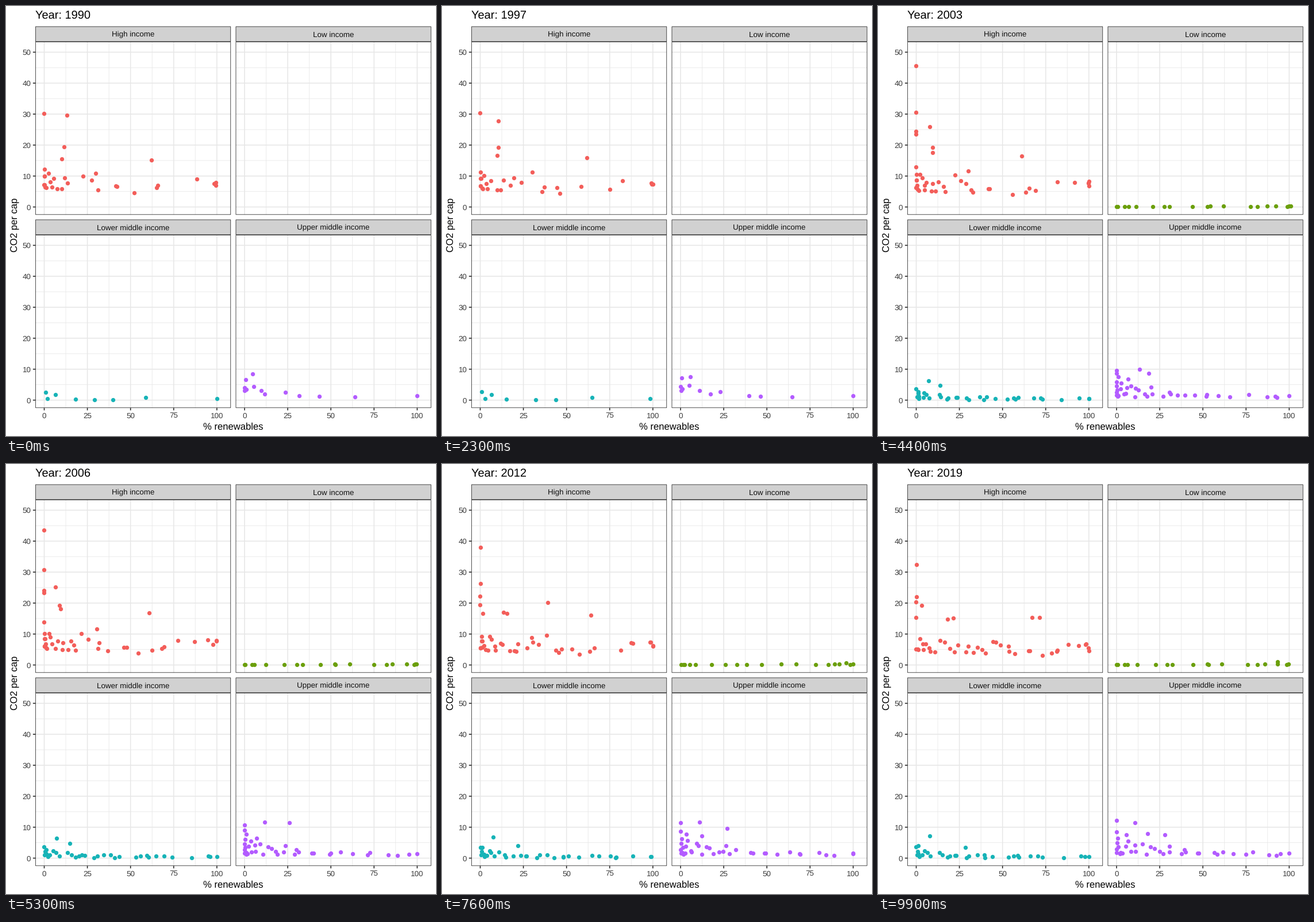
Recreate the animation shown at these times as a matplotlib script. Size 748 by 748 pixels, loop 10 s.

```python
import numpy as np
import matplotlib.pyplot as plt
from matplotlib.animation import FuncAnimation
from matplotlib.patches import Rectangle

SIZE, FRAMES = 748, 100
PX = 0.72  # points per pixel at 100 dpi
LAST = FRAMES - 1
LATE = 34 / LAST  # moment when the remaining countries enter
MIDDLE = 53 / LAST
GRID, DARK, LABEL, STRIP = "#e7e7e7", "#242424", "#3b3b3b", "#d1d1d1"
PANEL_W, PANEL_H, STRIP_H = 340.1, 301, 26.7
COLUMNS, ROWS = (51.05, 399.55), (62.2, 398.2)

plt.rcParams["font.family"] = ["Liberation Sans", "DejaVu Sans"]
plt.rcParams["text.hinting"] = "none"
fig = plt.figure(figsize=(SIZE / 100, SIZE / 100), dpi=100, facecolor="white")
ax = fig.add_axes([0, 0, 1, 1])
ax.set(xlim=(0, SIZE), ylim=(SIZE, 0))
ax.axis("off")


def text(x, y, s, px, color="black", **kw):
    return ax.text(x, y, s, fontsize=px * PX, color=color, va="baseline", **kw)


def line(xs, ys, color, width, z=1):
    ax.plot(xs, ys, color=color, lw=width * PX, zorder=z, solid_capstyle="butt", snap=False)


def box(x, y, w, h, fill):
    """Rectangle whose thin outline lies inside its edges."""
    ax.add_patch(Rectangle((x + 0.4, y + 0.4), w - 0.8, h - 0.8, fc=fill, ec=DARK,
                           lw=0.8 * PX, zorder=4, snap=False))


class Crowd:
    """Evenly scattered dots: share follows a power law, height fades with share."""

    def __init__(self, seed, early, late, power, height, trend=0.0):
        rng = np.random.default_rng(seed)
        self.early, self.power, self.height, self.trend = early, power, height, trend
        self.rank = (0.5 + 0.618034 * np.arange(late)) % 1
        self.phase, self.level, self.extra = rng.random((3, late))

    def share(self, t):
        sway = 0.02 * np.sin(2 * np.pi * (2 * t + self.phase))
        return 100 * np.clip(1.04 * (self.rank + sway), 0, 1) ** self.power(t)

    def at(self, t):
        base, spread, rise, reach = self.height
        x = self.share(t)
        y = base + spread * self.level + rise * self.extra ** 2 * np.exp(-x / reach)
        y = y * (1 + self.trend * (t - 0.5))
        n = len(x) if t >= LATE else self.early
        return np.column_stack([x, y])[:n]


class Basin(Crowd):
    """A crowd that gathers at both ends of the share axis."""

    def share(self, t):
        sway = 0.02 * np.sin(2 * np.pi * (2 * t + self.phase))
        return 50 - 50 * np.cos(np.pi * np.clip(self.rank + sway, 0, 1))


class Panel:
    def __init__(self, title, color, col, row, crowd, tracks):
        self.left, self.top = COLUMNS[col], ROWS[row]
        self.bottom = self.top + PANEL_H
        self.crowd, self.tracks = crowd, tracks
        self.draw_frame(title)
        self.dots = ax.scatter([], [], s=(7.3 * PX) ** 2, color=color, lw=0, zorder=3)

    def to_px(self, x, y):
        return self.left + 15.45 + 3.003 * x, self.bottom - 13.6 - 5.385 * y

    def draw_frame(self, title):
        l, t, b = self.left, self.top, self.bottom
        r = l + PANEL_W
        for v in np.arange(0, 101, 12.5):
            x = self.to_px(v, 0)[0]
            line([x, x], [t, b], GRID, 0.8 if v % 25 else 1.6)
        for v in range(0, 51, 5):
            y = self.to_px(0, v)[1]
            line([l, r], [y, y], GRID, 0.8 if v % 10 else 1.6)
        box(l, t, PANEL_W, PANEL_H, "none")
        box(l, t - STRIP_H, PANEL_W, STRIP_H, STRIP)
        text((l + r) / 2, t - 8.5, title, 13.33, "#101010", ha="center", zorder=5)

    def show(self, t):
        leaders = [[np.interp(t, (born, MIDDLE, 1), v) for v in (xs, ys)]
                   for born, xs, ys in self.tracks if t >= born]
        pts = np.vstack([self.crowd.at(t), np.reshape(leaders, (-1, 2))])
        self.dots.set_offsets(np.column_stack(self.to_px(*pts.T)))


# Tracks: moment of entry, then shares and heights at entry, middle and end.
high = Panel(
    "High income", "#f35e5a", 0, 0,
    Crowd(4, 25, 36, lambda t: 3.2 - 1.65 * t ** 2.5, (3.2, 5, 5, 40), -0.35),
    [(0, (0, 0, 0.2), (30.2, 30.7, 22)),
     (0, (13.2, 6.6, 71.5), (29.6, 25.2, 15.3)),
     (0, (11.5, 8.9, 18.2), (19.4, 19.2, 14.7)),
     (0, (10, 9.5, 21.4), (15.5, 18.1, 15.2)),
     (0, (62.2, 60.9, 67), (15.1, 16.8, 15.4)),
     (0, (29.8, 30.4, 46.2), (10.9, 11.7, 7.4)),
     (0, (99.5, 99.6, 98.2), (6.9, 7.9, 6.7)),
     (0, (98.3, 99.9, 100), (7.6, 7.7, 4.6)),
     (LATE, (0, 0, 0.2), (48, 43.6, 32.5)),
     (LATE, (0, 0, 0), (24.8, 24.1, 20.3)),
     (LATE, (0, 0, 0), (23.7, 23.4, 15.3)),
     (LATE, (0, 0, 3.2), (12, 13.8, 19.3))])
low = Panel(
    "Low income", "#6b9f0b", 1, 0,
    Basin(2, 0, 18, None, (0.05, 0.2, 0, 1)),
    [(LATE, (103, 99, 93.1), (0.1, 0.3, 1))])
lower = Panel(
    "Lower middle income", "#17b3b7", 0, 1,
    Crowd(7, 7, 32, lambda t: 1.8, (0.1, 1, 3, 15)),
    [(0, (0.8, 1.2, 1), (2.5, 2.8, 4)),
     (LATE, (7.1, 7, 7.8), (6.1, 6.4, 7.2)),
     (LATE, (12.7, 14.7, 28.6), (5, 4.7, 3.5))])
upper = Panel(
    "Upper middle income", "#b35cff", 1, 1,
    Crowd(5, 11, 36, lambda t: 3.1 - 1.1 * t, (0.7, 1.2, 4.5, 35), 0.2),
    [(0, (0.7, 1, 5.5), (6.7, 7.8, 7.5)),
     (0, (4.5, 7, 17.9), (8.4, 6.5, 7.9)),
     (LATE, (0, 0, 0), (8.5, 10.7, 12.2)),
     (LATE, (0.1, 0, 0), (8.2, 9, 8.4)),
     (LATE, (15, 11.7, 10.5), (8, 11.6, 11.5)),
     (LATE, (10.4, 26, 27.9), (5.4, 11.5, 7.6))])
panels = [high, low, lower, upper]

for p in (high, lower):
    for v in range(0, 51, 10):
        y = p.to_px(0, v)[1]
        line([46.9, p.left], [y, y], DARK, 1.6)
        text(43.4, y + 4.8, str(v), 13.33, LABEL, ha="right")
for p in (lower, upper):
    for v in range(0, 101, 25):
        x = p.to_px(v, 0)[0]
        line([x, x], [p.bottom, p.bottom + 4.2], DARK, 1.6)
        text(x, 717, str(v), 13.33, LABEL, ha="center")

text(395.4, 736.6, "% renewables", 16.67, ha="center")
text(20.4, 380.5, "CO2 per cap", 16.67, ha="center", rotation=90, rotation_mode="anchor")
heading = text(COLUMNS[0], 23, "", 20)


def update(frame):
    t = frame / LAST
    heading.set_text(f"Year: {round(1990 + 29 * t)}")
    for p in panels:
        p.show(t)
    return [heading, *(p.dots for p in panels)]


anim = FuncAnimation(fig, update, frames=FRAMES, interval=100, repeat=True, repeat_delay=0)
plt.show()
```
